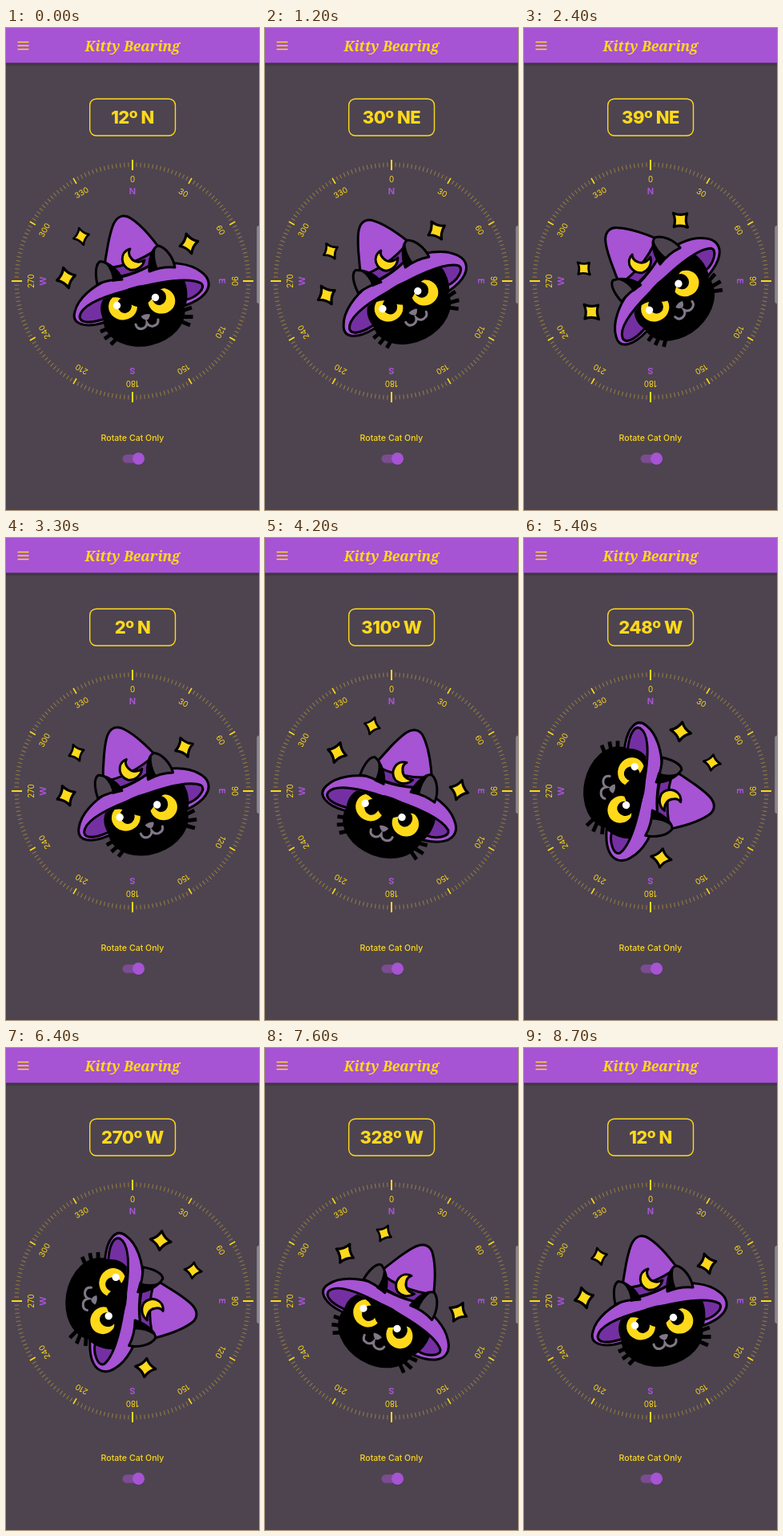
Recreate the animation shown at these times as an HTML page. Size 316 by 600 pixels, loop 8.8 s.

```html
<!DOCTYPE html>
<html lang="en">
<head>
<meta charset="utf-8">
<title>Kitty Bearing</title>
<style>
  html, body { margin: 0; width: 100%; height: 100%; overflow: hidden; background: #4d4450; }
  svg { display: block; width: 100%; height: 100%; }
  text { font-family: Inter, "Open Sans", sans-serif; text-anchor: middle; fill: #ffd91a; }
  .title { font: italic 700 17.5px "Noto Serif", serif; }
  .readout { font-size: 22px; font-weight: 800; letter-spacing: -.5px; }
  .label { font-size: 10.6px; font-weight: 500; }
  .degree { font-size: 9.8px; }
  .cardinal { font-size: 11px; font-weight: 700; fill: #a653d4; }
  .gold { stroke: #ffd91a; }
  .minor { stroke: #987f3e; }
  .outline { stroke: #000; stroke-width: 3; stroke-linejoin: round; }
  .purple { fill: #a653d4; }
  .shade { fill: #7430a2; }
  .yellow { fill: #ffd91a; }
  .gray { fill: #4d4450; }
</style>
</head>
<body>
<svg viewBox="0 0 316 600">
  <defs>
    <linearGradient id="shadow" x2="0" y2="1">
      <stop stop-color="#000" stop-opacity=".32"/>
      <stop offset="1" stop-color="#000" stop-opacity="0"/>
    </linearGradient>
    <path id="star" d="M0-12Q3.2-3.8 11 0Q3.2 3.8 0 12Q-3.2 3.8-11 0Q-3.2-3.8 0-12Z"/>
  </defs>

  <rect width="316" height="600" fill="#4d4450"/>
  <rect y="43" width="316" height="5" fill="url(#shadow)"/>
  <rect width="316" height="43.4" class="purple"/>
  <path d="M14.5 17.5h14M14.5 22h14M14.5 26.5h14" class="gold" stroke-width="1.5"/>
  <text x="158" y="29" class="title">Kitty Bearing</text>

  <rect x="104.7" y="88.2" width="106.8" height="45.8" rx="8" fill="none" class="gold" stroke-width="1.4"/>
  <text id="readout" x="158" y="119" class="readout">12º N</text>

  <g id="dial" transform="translate(158 315)"></g>

  <g id="cat">
    <!-- hat -->
    <path class="outline purple" d="M122 307C124 284 130 250 136 241C141 233 149 232 156 237C170 246 183 262 193 276V303L130 318Z"/>
    <path class="outline shade" d="M123 299C145 298 170 289 190 274L193 287C177 300 150 310 124 312Z"/>
    <path class="outline purple" d="M86 353C90 336 109 321 128 313C141 312 165 305 181 295C206 290 230 293 243 303C255 311 256 322 248 331C242 338 233 342 225 345L121 367C101 373 81 370 86 353Z"/>
    <path class="outline shade" d="M92 359C94 345 119 335 150 327C190 316 228 309 244 318C250 324 237 336 225 338L120 363C104 368 92 367 92 359Z"/>
    <!-- head -->
    <path d="M129 373l-11 5M133 380l-10 7M140 385l-9 9M220 352l12-4M221 359.500h12.500M218 365l12 5" class="outline" style="stroke-width: 4.8"/>
    <ellipse cx="172.5" cy="358" rx="51.500" ry="38" transform="rotate(-12 172.5 358)"/>
    <path d="M122 364C117 354 117 346 121 338L150 326Q190 315 222 313C227 322 228 336 224 347Z"/>
    <!-- ears -->
    <path class="outline gray" d="M114 319C111 305 112 293 118 290.500C128 292 141 302 145 313C135 313 123 315 114 319Z"/>
    <path class="outline gray" d="M179 303C178 288 183 273 190 271C200 273 209 286 211 298C201 297 189 299 179 303Z"/>
    <path d="M124 293Q141 300 146 314L133 316Q133 303 124 293ZM187 273Q177 286 178 304L190 300Q184 286 187 273Z"/>
    <path class="outline yellow" d="M155 275C141 279 143 297 155 301C164 302 171 297 173 289C166 293 159 291 156 286C153 282 153 278 155 275Z"/>
    <!-- face -->
    <path class="yellow" d="M133 335.500A18 16.500 0 1 0 164 347Q158 346 150 340T133 335.500Z"/>
    <path class="yellow" d="M198 324A17 16 0 1 1 177.500 342Q182 338 187 331T198 324Z"/>
    <ellipse cx="148" cy="345" rx="9" ry="10" transform="rotate(-12 148 345)"/>
    <ellipse cx="191" cy="335" rx="9" ry="10" transform="rotate(-12 191 335)"/>
    <g fill="#fff"><circle cx="138.5" cy="345.5" r="4.7"/><circle cx="186.5" cy="335.5" r="4.7"/></g>
    <path fill="#817887" d="M168.5 359Q174 355 180 356.500Q179 363 175.500 363.500Q171 363 168.5 359Z"/>
    <path d="M162 369Q164 376 171 374Q176 372 176 367Q179 372 184 371Q191 369 190 363" fill="none" stroke="#817887" stroke-width="3" stroke-linecap="round"/>
    <!-- sparkles -->
    <g class="outline yellow">
      <use href="#star" transform="translate(94 259.500) rotate(-15) scale(.9)"/>
      <use href="#star" transform="translate(75 311) rotate(-15) scale(1.08)"/>
      <use href="#star" transform="translate(228.5 268.500) rotate(-15) scale(1.06)"/>
    </g>
  </g>

  <text x="158" y="514" class="label">Rotate Cat Only</text>
  <rect x="145.5" y="531" width="25" height="10.5" rx="5.25" fill="#7b4c91"/>
  <circle cx="165.5" cy="537" r="7.7" opacity=".15"/>
  <circle cx="165.5" cy="536.2" r="7.6" class="purple"/>
  <path d="M316 246q-2.8 0-2.8 3v91q0 3 2.8 3z" fill="#8b868d"/>
</svg>

<script>
const LOOP = 8800, STEP = 100;
const dial = document.getElementById('dial');
const cat = document.getElementById('cat');
const readout = document.getElementById('readout');

// Seconds and degrees; the cat trails the reading.
const headingKeys = [[0, 12], [.4, 12], [1.9, 45], [2.4, 39], [4.2, -50], [5.4, -112],
  [5.8, -115], [6.4, -90], [7.6, -32], [8.7, 12]];
const catKeys = [[0, 0], [.5, 0], [2, -33], [2.4, -30.3], [4.2, 32.5], [5.4, 114.3],
  [5.9, 121], [6.4, 112.3], [7.6, 42.8], [8.7, 0]];

function add(name, attrs, content = '') {
  const node = document.createElementNS(dial.namespaceURI, name);
  for (const key in attrs) node.setAttribute(key, attrs[key]);
  node.textContent = content;
  dial.append(node);
}

function tick(angle, inner, outer, style, width) {
  add('line', { y1: -inner, y2: -outer, class: style, 'stroke-width': width, transform: `rotate(${angle})` });
}

function dialText(angle, radius, style, content) {
  add('text', { y: -radius, class: style, transform: `rotate(${angle})` }, content);
}

for (let angle = 0; angle < 360; angle += 2) {
  if (angle % 90 === 0) tick(angle, 138, 151, 'gold', 2);
  else if (angle % 30 === 0) tick(angle, 140, 148, 'gold', 1.6);
  else tick(angle, 142, 147.5, 'minor', 1);
  if (angle % 30 === 0) dialText(angle, 123.5, 'degree', angle);
}
['N', 'E', 'S', 'W'].forEach((name, i) => dialText(i * 90, 108, 'cardinal', name));

const slope = (a, b) => (b[1] - a[1]) / (b[0] - a[0]);

function tangent(keys, i) {
  if (i === 0 || i === keys.length - 1) return 0;
  const before = slope(keys[i - 1], keys[i]);
  const after = slope(keys[i], keys[i + 1]);
  return before * after <= 0 ? 0 : 2 * before * after / (before + after);
}

// Monotone cubic interpolation between keys.
function sample(keys, time) {
  let i = 0;
  while (i < keys.length - 2 && time > keys[i + 1][0]) i++;
  const [t0, v0] = keys[i], [t1, v1] = keys[i + 1];
  const span = t1 - t0, u = Math.min(1, (time - t0) / span), w = 1 - u;
  return v0 * w * w * (1 + 2 * u) + v1 * u * u * (3 - 2 * u)
    + span * u * w * (w * tangent(keys, i) - u * tangent(keys, i + 1));
}

function direction(degrees) {
  if (degrees >= 247.5 && degrees < 337.5) return 'W';
  return ['N', 'NE', 'E', 'SE', 'S', 'SW'][Math.round(degrees / 45) % 8];
}

function draw() {
  const time = Math.floor(performance.now() % LOOP / STEP) * STEP / 1000;
  const heading = (Math.round(sample(headingKeys, time)) + 360) % 360;
  const label = `${heading}º ${direction(heading)}`;
  if (readout.textContent !== label) readout.textContent = label;
  cat.setAttribute('transform', `rotate(${sample(catKeys, time)} 158 315)`);
  requestAnimationFrame(draw);
}
draw();
</script>
</body>
</html>
```
